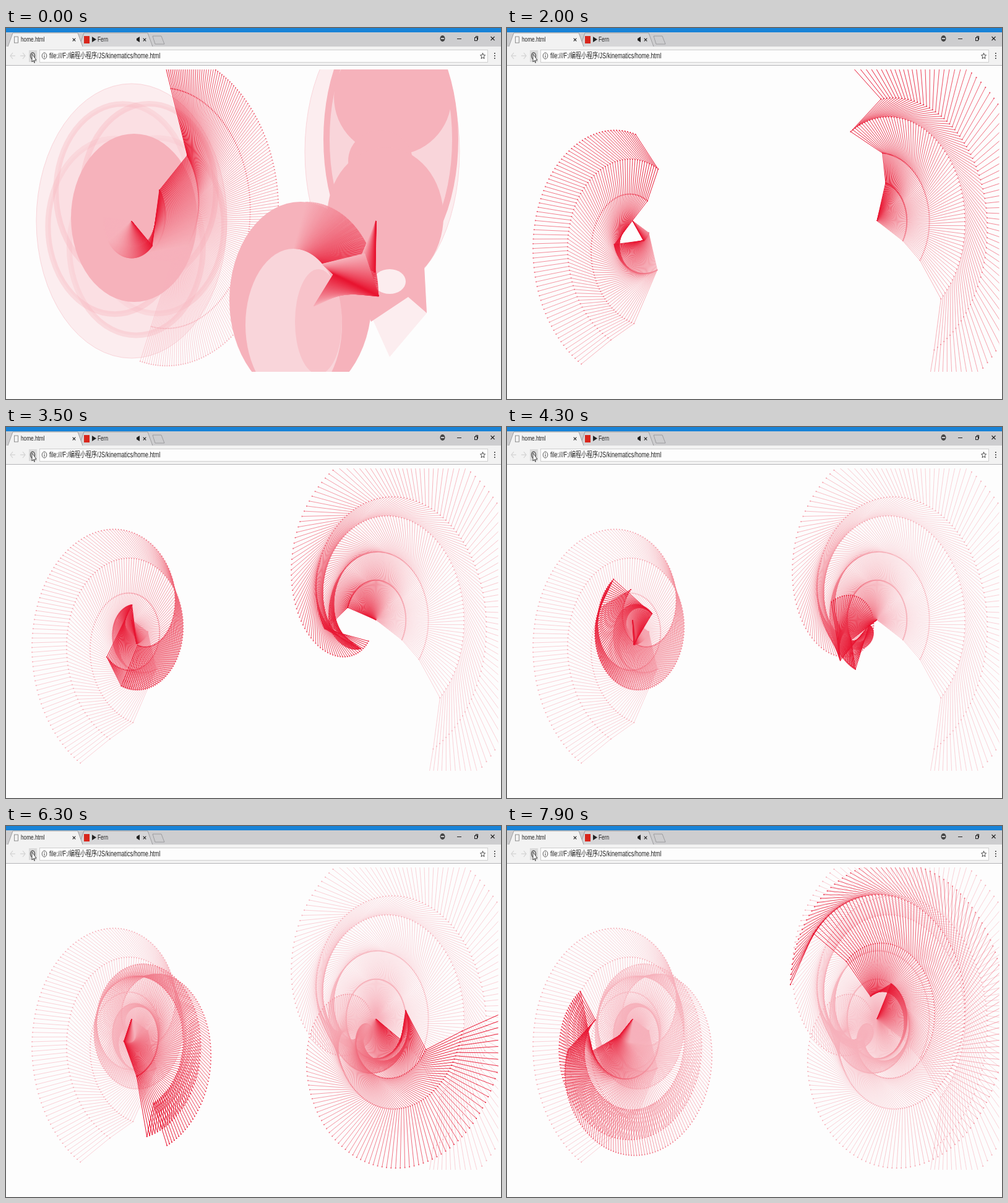
These frames come from a looping animation (800x600 px, 8000 ms). An HTML page with a canvas:

```html
<!DOCTYPE html>
<html>
<head>
<meta charset="utf-8">
<style>
html, body { margin: 0; width: 100%; height: 100%; overflow: hidden; background: #fdfdfd; }
canvas { display: block; width: 800px; height: 600px; }
</style>
</head>
<body>
<canvas id="stage" width="800" height="600"></canvas>
<script>
const ctx = document.getElementById('stage').getContext('2d');
const LOOP = 8000, STEP = 100, RELOAD = 0.23, RATE = 44;
const SQUEEZE = 0.75; // the screen is narrowed sideways
const CY = 312, LEFT = 203, RIGHT = 598;
const PAPER = '#fdfdfd', INK = '#222', TABS = '#cdcdcf', BAR = '#f2f2f2';

// Segments: [length, angle in degrees at time 0, degrees per second]
const arms = [
  { x: LEFT, seg: [[39.5, 29, 14.1], [63, 73, 57.9], [100, 120, 111.6], [56.5, 152, 81.3], [74.5, 148.5, 46]] },
  { x: RIGHT, seg: [[64.3, 30, -59], [48.5, 40.5, -79], [77, 54, -118.4], [84, 100, -79.3], [96.5, 102.5, -138.6]] }
];
const oldArm = { x: LEFT, seg: [[59.5, 42, -39], [91, -80, -34], [82, -43, -13], [114, -108, -60], [61, -108, -60]] };

// The trail fades towards a residue that never clears
const RESIDUE = 0.32;
const fade = age => Math.max(RESIDUE, Math.exp(-age / 2.4));
const red = a => `rgb(${253 - 21 * a},${253 - 233 * a},${253 - 205 * a})`;
const PINK = red(RESIDUE), PALE = red(0.17), FAINT = red(0.07);

function path(points) {
  ctx.beginPath();
  for (const [x, y] of points) ctx.lineTo(x, y);
}

function line(points, color = INK, width = 1) {
  path(points);
  ctx.strokeStyle = color;
  ctx.lineWidth = width;
  ctx.stroke();
}

function shape(points, color) {
  path(points);
  ctx.fillStyle = color;
  ctx.fill();
}

function oval(x, y, rx, ry, fill, stroke, width = 1) {
  ctx.beginPath();
  ctx.ellipse(x, y, rx, ry, 0, 0, 7);
  if (fill) {
    ctx.fillStyle = fill;
    ctx.fill();
  }
  if (stroke) {
    ctx.strokeStyle = stroke;
    ctx.lineWidth = width;
    ctx.stroke();
  }
}

function box(x, y, w, h, color) {
  ctx.fillStyle = color;
  ctx.fillRect(x, y, w, h);
}

function drawPose(arm, time, a) {
  let x = arm.x, y = CY;
  const points = [[x, y]];
  for (const [len, start, speed] of arm.seg) {
    const angle = (start + speed * time) * Math.PI / 180;
    x += len * SQUEEZE * Math.cos(angle);
    y += len * Math.sin(angle);
    points.push([x, y]);
  }
  line(points, red(a), 0.4 + 0.6 * a);
  for (const [px, py] of points.slice(1)) box(px - 0.9, py - 0.9, 1.8, 1.8, red(a));
}

function drawTrail(arm, from, to) {
  for (let i = Math.ceil(from * RATE); i <= to * RATE; i++) {
    drawPose(arm, i / RATE, fade(to - i / RATE));
  }
}

// Lines from a(k) to b(k), growing redder as k goes from 0 to 1
function sweep(a, b) {
  for (let k = 0; k <= 1; k += 0.008) line([a(k), b(k)], red(RESIDUE + (1 - RESIDUE) * k), 1.3);
}

const between = (p, q) => k => [p[0] + (q[0] - p[0]) * k, p[1] + (q[1] - p[1]) * k];
const arc = (x, y, rx, ry, from, to) => k => {
  const t = from + (to - from) * k;
  return [x + rx * Math.cos(t), y + ry * Math.sin(t)];
};

function drawOldScene(time) {
  // left: overlapping loops around a filled core
  oval(LEFT, CY, 154, 222, FAINT, PALE);
  ctx.globalAlpha = 0.35;
  for (let i = 0; i < 5; i++) {
    const [x, y] = arc(210, 305, 36, 50, 0.3, 6.6)(i / 5);
    oval(x, y, 108, 142, PALE, PINK, 9);
  }
  ctx.globalAlpha = 1;
  oval(207, 307, 102, 136, PINK);
  drawTrail(oldArm, time - 3.7, time);

  // right: two stacked blobs inside a tall loop
  oval(608, 200, 125, 225, FAINT, PALE);
  oval(622, 180, 104, 205, PALE, PINK, 10);
  shape([[592, 470], [676, 390], [680, 461], [620, 532]], FAINT);
  oval(625, 112, 95, 94, PINK);
  oval(605, 215, 52, 50, PINK);
  oval(613, 305, 94, 112, PINK);
  shape([[560, 400], [676, 385], [680, 461], [650, 435], [590, 475]], PINK);
  oval(620, 410, 26, 20, FAINT);

  // right: lower loop and the newest sweeps
  oval(476, 440, 115, 159, PINK);
  oval(465, 480, 78, 123, PALE);
  oval(505, 475, 38, 85, red(0.25));
  sweep(arc(485, 432, 117, 151, -1.57, 0), arc(465, 480, 78, 123, -1.57, -0.87));
  const elbow = [603, 434], hand = [529, 398], pivot = [RIGHT, CY];
  sweep(between([570, 380], [597, 396]), () => pivot);
  sweep(between([511, 382], hand), between([580, 365], elbow));
  sweep(between([497, 450], hand), between([545, 428], elbow));
}

function text(str, x, y, size) {
  ctx.save();
  ctx.translate(x, y);
  ctx.scale(SQUEEZE, 1);
  ctx.font = `${size}px "Liberation Sans", "Noto Sans CJK SC", "Noto Sans CJK", sans-serif`;
  ctx.fillStyle = INK;
  ctx.fillText(str, 0, 0);
  ctx.restore();
}

function cross(x, y, r) {
  for (const s of [-1, 1]) line([[x - r, y - r * s], [x + r, y + r * s]], INK, 1.1);
}

function tab(x, w, color) {
  const p = [[x, 30], [x + 8, 8], [x + w - 8, 8], [x + w, 30]];
  shape(p, color);
  line(p, '#909092', 0.8);
}

function drawTabs() {
  box(0, 0, 800, 7, '#1883d7');
  box(0, 7, 800, 24, TABS);
  tab(118, 119, '#d6d6d8');
  box(0, 30, 800, 30, BAR);
  tab(3, 121, BAR);
  line([[0, 60.5], [800, 60.5]], '#b6b6b8');
  line([[237, 13], [251, 13], [256, 26], [241, 26], [237, 13]], '#909092', 0.8);

  ctx.strokeStyle = '#777';
  ctx.strokeRect(13.5, 14, 6, 10);
  text('home.html', 24, 22, 11);
  cross(110, 19, 2.3);
  box(126, 13, 9, 12, '#d8261c');
  shape([[139, 14], [146, 18.5], [139, 23]], INK);
  text('Fern', 148, 22, 11);
  shape([[211, 17], [216, 14], [216, 23], [211, 20]], INK);
  cross(224, 19, 2.3);

  // window buttons
  oval(705.5, 17, 4, 5, '#444');
  box(703, 16, 5, 2, TABS);
  line([[729, 17.5], [736, 17.5]]);
  ctx.strokeRect(759.5, 13.5, 3, 5);
  box(757, 15, 5, 6, TABS);
  ctx.strokeRect(757.5, 15.5, 4, 5);
  cross(786.5, 17, 3);
}

function drawToolbar() {
  for (const [x, s] of [[11, 1], [27, -1]]) {
    line([[x - 4, 45], [x + 4, 45]], '#d2d2d2', 1.2);
    line([[x, 40], [x - 4 * s, 45], [x, 50]], '#d2d2d2', 1.2);
  }
  box(37, 36, 13, 19, '#dadada');
  oval(43, 45, 3.5, 5, null, '#555', 1.3);
  const pointer = [[42, 42], [42, 55], [44.3, 52.5], [46, 56.5], [46, 52], [49, 52], [42, 42]];
  shape(pointer, '#fff');
  line(pointer, INK, 0.8);

  box(54, 35, 725, 21, PAPER);
  ctx.strokeStyle = '#c4c4c4';
  ctx.strokeRect(54.5, 35.5, 724, 20);
  oval(62, 45, 3.8, 5, null, '#444', 0.9);
  box(61.5, 42, 1, 1.3, '#444');
  box(61.5, 44.3, 1, 3.6, '#444');
  text('file:///F:/编程小程序/JS/kinematics/home.html', 70, 49, 12);
  const star = [];
  for (let i = 0; i <= 10; i++) {
    const r = i % 2 ? 2.2 : 5, a = i * Math.PI / 5;
    star.push([770.5 + r * 0.85 * Math.sin(a), 45.5 - r * Math.cos(a)]);
  }
  line(star, '#333', 0.9);
  for (let i = 0; i < 3; i++) box(789, 40 + 4 * i, 1.6, 2, '#444');
}

function draw(time) {
  box(0, 0, 800, 600, PAPER);
  ctx.save();
  ctx.beginPath();
  ctx.rect(5.5, 67, 790, 489);
  ctx.clip();
  if (time < RELOAD) drawOldScene(time);
  else for (const arm of arms) drawTrail(arm, 0, time - RELOAD);
  ctx.restore();
  drawTabs();
  drawToolbar();
}

let shown = -1;
const begin = performance.now();
function tick() {
  const step = Math.floor((performance.now() - begin) % LOOP / STEP);
  if (step !== shown) draw((shown = step) * STEP / 1000);
  requestAnimationFrame(tick);
}
tick();
</script>
</body>
</html>
```
